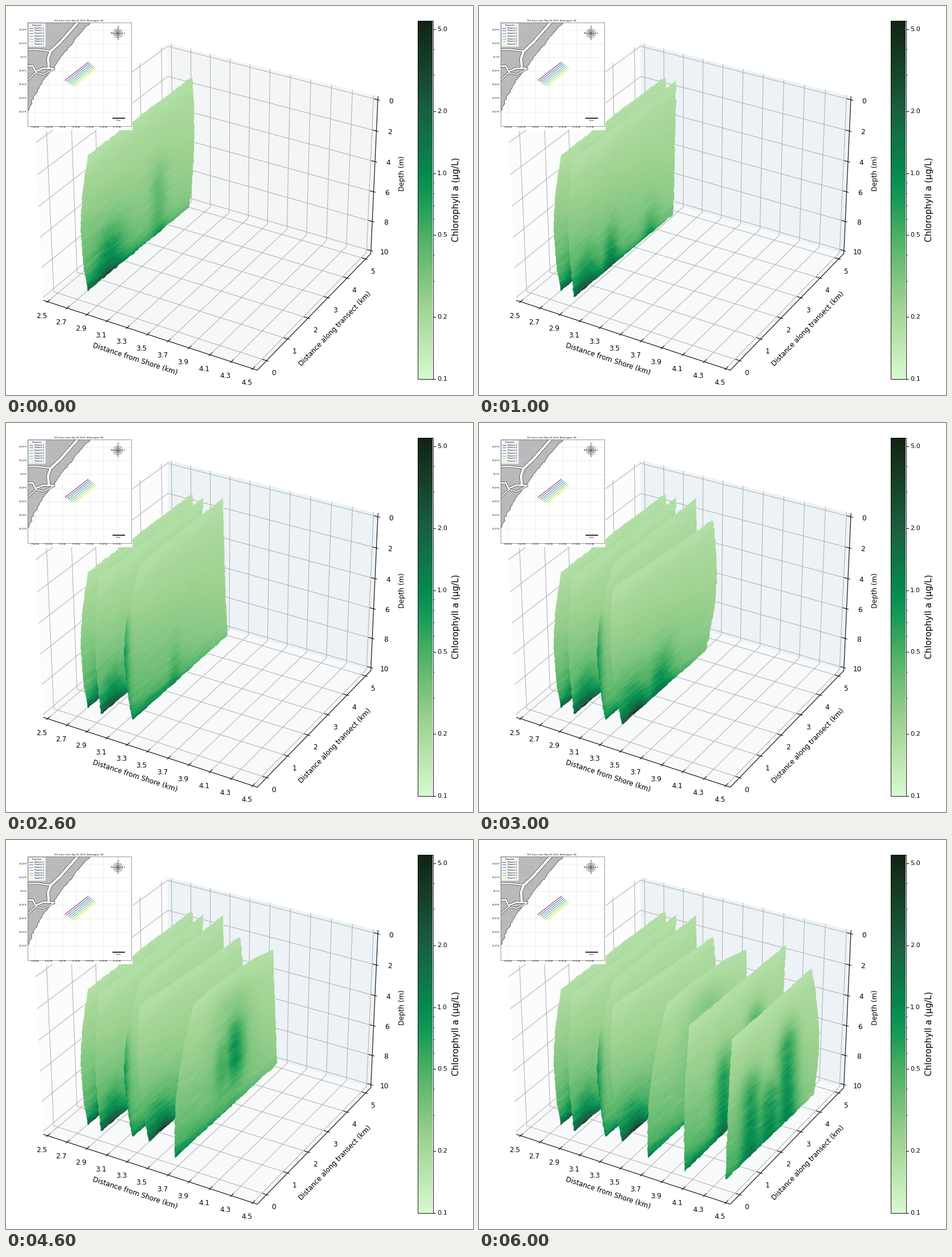
A matplotlib script for the animation above (7000 ms loop, 820 by 683 pixels).

```python
import numpy as np
import matplotlib.pyplot as plt
from matplotlib.animation import FuncAnimation
from matplotlib.colors import LinearSegmentedColormap
from matplotlib.patches import Circle, Polygon, Rectangle

W, H, DPI = 820, 683, 64
PT = 72 / DPI
plt.rcParams["font.family"] = "DejaVu Sans"

fig = plt.figure(figsize=(W / DPI, H / DPI), dpi=DPI, facecolor="white")
ax = fig.add_axes([0, 0, 1, 1])
ax.axis("off")
rng = np.random.default_rng(5)

ALGAE = LinearSegmentedColormap.from_list("algae", [
    (0, "#d7f9d0"), (.2, "#a0d392"), (.4, "#4cb064"), (.5, "#199a57"),
    (.575, "#07894f"), (.75, "#1a5f41"), (1, "#122414")])


def line(pts, color="black", width=1.0, z=2, **kw):
    x, y = np.transpose(pts)
    return ax.plot(x, y, color=color, lw=width * PT, zorder=z, **kw)[0]


def poly(pts, face, edge="none", width=0.5, z=0):
    return ax.add_patch(Polygon(pts, closed=True, fc=face, ec=edge,
                                lw=width * PT, zorder=z))


def rect(x, y, w, h, face="none", edge="none", width=1.0, z=3):
    return ax.add_patch(Rectangle((x, y), w, h, fc=face, ec=edge,
                                  lw=width * PT, zorder=z))


def text(x, y, s, size, ha="center", **kw):
    ax.text(x, y, s, fontsize=size * PT, ha=ha, va="center", zorder=12, **kw)


def rough(pts, step=4.5, bump=.5):
    """Resample a closed outline and make it slightly bumpy."""
    p = np.vstack([pts, pts[:1]]).astype(float)
    dist = np.r_[0, np.cumsum(np.hypot(*np.diff(p, axis=0).T))]
    s = np.arange(0, dist[-1], step)
    q = np.c_[np.interp(s, dist, p[:, 0]), np.interp(s, dist, p[:, 1])]
    return q + rng.normal(0, bump, q.shape)


# ---- 3D box, coordinates run from -1 to 1 on each axis ----

def project(a, b, c):
    """Perspective view at azimuth -60, elevation 30, box aspect 4:4:3."""
    x, y, z = .5952 * a, .5952 * b, .4464 * c
    k = 3612 / (10 - (.433 * x - .75 * y + .5 * z))
    return (358.5 + k * (.866 * x + .5 * y),
            338.5 - k * (-.25 * x + .433 * y + .866 * z))


def seg(*pts, **kw):
    return line([project(*p) for p in pts], **kw)


def pane(a, b, c, d, color):
    return poly([project(*p) for p in (a, b, c, d)], color)


left_pane = pane((-1, -1, -1), (-1, 1, -1), (-1, 1, 1), (-1, -1, 1), "#fcfcfc")
back_pane = pane((-1, 1, -1), (1, 1, -1), (1, 1, 1), (-1, 1, 1), "#f3f5f6")
floor_pane = pane((-1, -1, -1), (1, -1, -1), (1, 1, -1), (-1, 1, -1), "#f6f7f7")

GRID = dict(color="#b0b0b0", width=1.05, z=1)
IN, OUT = 1 - .0333, 1 + .0167
LABEL = 12.15

for i in range(11):
    t = .96 * (i / 5 - 1)
    seg((t, -1, -1), (t, 1, -1), (t, 1, 1), **GRID)
    seg((t, -IN, -1), (t, -OUT, -1))
    x, y = project(t, -1, -1)
    text(x - 10.5, y + 25, f"{2.5 + .2 * i:.1f}", LABEL)
for i in range(6):
    t = -.849 + .35 * i
    seg((1, t, -1), (-1, t, -1), (-1, t, 1), **GRID)
    seg((IN, t, -1), (OUT, t, -1))
    x, y = project(1, t, -1)
    text(x + 12.5, y + 22, str(i), LABEL)
for i in range(6):
    t = .96 * (1 - i / 2.5)
    seg((-1, -1, t), (-1, 1, t), (1, 1, t), **GRID)
    seg((IN, 1, t), (OUT, 1, t))
    x, y = project(1, 1, t)
    text(x + 23.5, y + 2.5, str(2 * i), LABEL)
seg((-1, -1, -1), (1, -1, -1), (1, 1, -1), (1, 1, 1), width=1.1)

text(227, 619.7, "Distance from Shore (km)", LABEL, rotation=-18.1)
text(578, 567, "Distance along transect (km)", LABEL, rotation=46)
text(696, 294, "Depth (m)", LABEL, rotation=90)


# ---- colour bar ----

def bar_y(value):
    return 655 - 629 * np.log(value / .1) / np.log(55)


ax.imshow(np.linspace(1, 0, 256)[:, None], cmap=ALGAE, extent=(723, 749, 655, 26),
          aspect="auto", zorder=2)
rect(723, 26, 26.5, 629, edge="black", width=.9)
for v in (.1, .2, .5, 1, 2, 5):
    line([(749.5, bar_y(v)), (753.5, bar_y(v))])
    text(757, bar_y(v), f"{v:.1f}", 11.3, ha="left")
for v in (.3, .4, .6, .7, .8, .9, 3, 4):
    line([(749.5, bar_y(v)), (751.8, bar_y(v))], width=.7)
text(790.5, 340, "Chlorophyll a (µg/L)", 15, rotation=90)


# ---- transect slices ----

YY, XX = np.mgrid[0:H, 0:W] + .5
slices = []


def streaks():
    """Noise smeared along the transect direction."""
    n = rng.standard_normal((H, W))
    n = sum(np.roll(n, (-round(.82 * k), k), (0, 1)) for k in range(18))
    n = sum(np.roll(n, k, 0) for k in range(4))
    return n / n.std()


def edge(p, q, bow=(0, 0)):
    t = np.linspace(0, 1, 20)[:, None]
    return np.add(p, np.subtract(q, p) * t) + np.sin(np.pi * t) * bow


def rise(x):
    return 1 / (1 + np.exp(-x / .06))


def chlorophyll(u, s, plumes, floor, foot):
    """Colour level at u along the transect (0-1) and relative depth s."""
    near = np.clip(1 - u, 0, 1)
    d = np.clip(s, 0, 1.05)
    level = .155 + (.1 + .16 * near) * d ** 1.25 - .02 * np.exp(-(s / .1) ** 2)
    level += floor * (.2 + near) * np.exp(-(1 - d) / .055)
    blend = sum((g * np.exp(-((u - at) / w) ** 2 / 2) * rise(s - top)
                 * rise(foot - s)) ** 3 for at, top, w, g in plumes)
    return level + blend ** (1 / 3)


def add_slice(tl, tr, br, bl, bow_left, bow_right, floor, plumes, foot=1.4, arch=0):
    """Each plume is (place along transect, top depth, width, strength)."""
    roof = tl[1] + (XX - tl[0]) * (tr[1] - tl[1]) / (tr[0] - tl[0])
    base = bl[1] + (XX - bl[0]) * (br[1] - bl[1]) / (br[0] - bl[0])
    lo = min(tl[0], bl[0]) + bow_left
    s, u = (YY - roof) / (base - roof), (XX - lo) / (tr[0] - lo)
    v = chlorophyll(u, s, plumes, floor, foot)
    v += (.003 + .05 * np.clip(v - .2, 0, .4)) * streaks()
    img = ax.imshow(ALGAE(np.clip(v, .1, 1), bytes=True), extent=(0, W, H, 0),
                    aspect="auto", interpolation="nearest", zorder=4 + .1 * len(slices))
    outline = np.vstack([edge(tl, tr, (0, -arch)), edge(tr, br, (bow_right, 0)),
                         edge(br, bl), edge(bl, tl, (bow_left, 0))])
    img.set_clip_path(Polygon(rough(outline), transform=ax.transData))
    slices.append(img)


add_slice((144, 261), (327, 124), (322, 353), (143, 501), -12, 6, .3,
          [(.26, .68, .09, .2), (.7, .5, .05, .1)])
add_slice((163, 270), (346, 131), (341, 366), (167, 512), -8, 1, .3,
          [(.17, .78, .08, .2), (.4, .75, .05, .2), (.76, .85, .05, .16)])
add_slice((236, 246), (381, 132), (389, 373), (222, 522), -21, -1, .25,
          [(.03, .3, .04, .24), (.53, .75, .04, .08)])
add_slice((235, 290), (411, 170), (399, 399), (251, 530), -11, 12, .25,
          [(.27, .9, .08, .36), (.22, .75, .14, .18), (.51, .74, .08, .22)])
add_slice((330, 287), (469, 191), (476, 393), (296, 559), -11, 0, .22,
          [(.64, .35, .07, .31), (.51, .45, .05, .18), (.62, .08, .14, .08)],
          foot=.8, arch=8)
add_slice((369, 325), (539, 184), (524, 424), (361, 582), -4, 1, .25,
          [(.4, .43, .06, .24), (.56, .5, .08, .25), (.7, .32, .06, .28)])
add_slice((444, 350), (584, 225), (588, 447), (433, 597), -1, 11, .08,
          [(.3, .42, .08, .24), (.52, .6, .1, .24), (.72, .32, .08, .28)])


# ---- inset map ----

rect(0, 0, 221.5, 218, face="white", z=7)
frame = rect(38, 29, 181.5, 181.5, edge="#555555", width=.6, z=11)

coast = poly(rough([(30, 20), (158, 20), (139, 38), (112, 70), (82, 109), (67, 128),
                    (50, 157), (36, 192), (30, 192)], 3, .6),
             "#b9b9b9", "#222222", .6, 8)
coast.set_clip_path(frame)


def channels(*routes):
    for color, extra in (("#222222", 1.2), ("white", 0)):
        for width, pts in routes:
            line(pts, color, width + extra, 8.5).set_clip_path(frame)


channels((4.5, [(132, 22), (95, 64), (78, 80), (74, 92), (75, 108)]),
         (2.5, [(34, 77), (52, 76), (76, 79)]),
         (3, [(34, 106), (47, 105), (52, 115), (66, 109), (84, 110)]),
         (2, [(34, 134), (52, 117), (66, 120), (82, 112)]))

for i in range(7):
    gx, gy = 50.5 + 24.1 * i, 42 + 24.05 * i
    line([(gx, 29), (gx, 210.5)], "#cccccc", .5, 9, alpha=.7)
    line([(38, gy), (219.5, gy)], "#cccccc", .5, 9, alpha=.7)
    text(gx, 213.5, f"{round(77.84 - .02 * i, 2)}°W", 3.3)
    text(36.5, gy, f"{round(34.24 - .02 * i, 2)}°N", 3.3, ha="right")
text(128.5, 26.3, "R/V Dune Lark, May 05 2023, Wilmington, NC", 3.8)

rect(39.3, 30.3, 30, 40.5, "#f1f4f9", "#d5d8de", .5, 10)
text(54, 33.8, "Transects", 3.4)
for i in range(7):
    c = plt.cm.viridis(i / 6)
    line([(103.5 + 2.8 * i, 130.5 + 1.8 * i), (144.5 + 2.3 * i, 98.7 + 1.8 * i)],
         c, .8, 10)
    y = 38.6 + 4.75 * i
    line([(41, y), (47, y)], c, .7, 11)
    text(50.5, y, f"Transect {i + 1}", 3.3, ha="left")

CX, CY = 196.5, 48
for r in (8, 5.5):
    ax.add_patch(Circle((CX, CY), r, fc="none", ec="#444444", lw=.6 * PT, zorder=11))
ang = np.arange(8) * np.pi / 4
for turn, reach in ((np.pi / 4, 6), (0, 9)):
    rad = np.where(np.arange(8) % 2, 1.3, reach)
    poly(np.c_[CX + rad * np.cos(ang + turn), CY + rad * np.sin(ang + turn)],
         "#888888", "#333333", .3, 11)
for a, s in zip(ang[::2], "ESWN"):
    text(CX + 11 * np.cos(a), CY + 11 * np.sin(a), s, 3.2)

line([(186.5, 197), (209, 197)], width=1.6, z=11, solid_capstyle="butt")
text(197.5, 200.6, "2 km", 3.4)

ax.set_xlim(0, W)
ax.set_ylim(H, 0)


def update(i):
    for k, img in enumerate(slices):
        img.set_visible(k <= i)
    back_pane.set_facecolor("#ecf2f5" if i else "#f3f5f6")
    floor_pane.set_facecolor("#f7f9fa" if i else "#f6f7f7")
    return slices


anim = FuncAnimation(fig, update, frames=7, interval=1000, repeat=True,
                     repeat_delay=0, blit=False)
plt.show()
```
